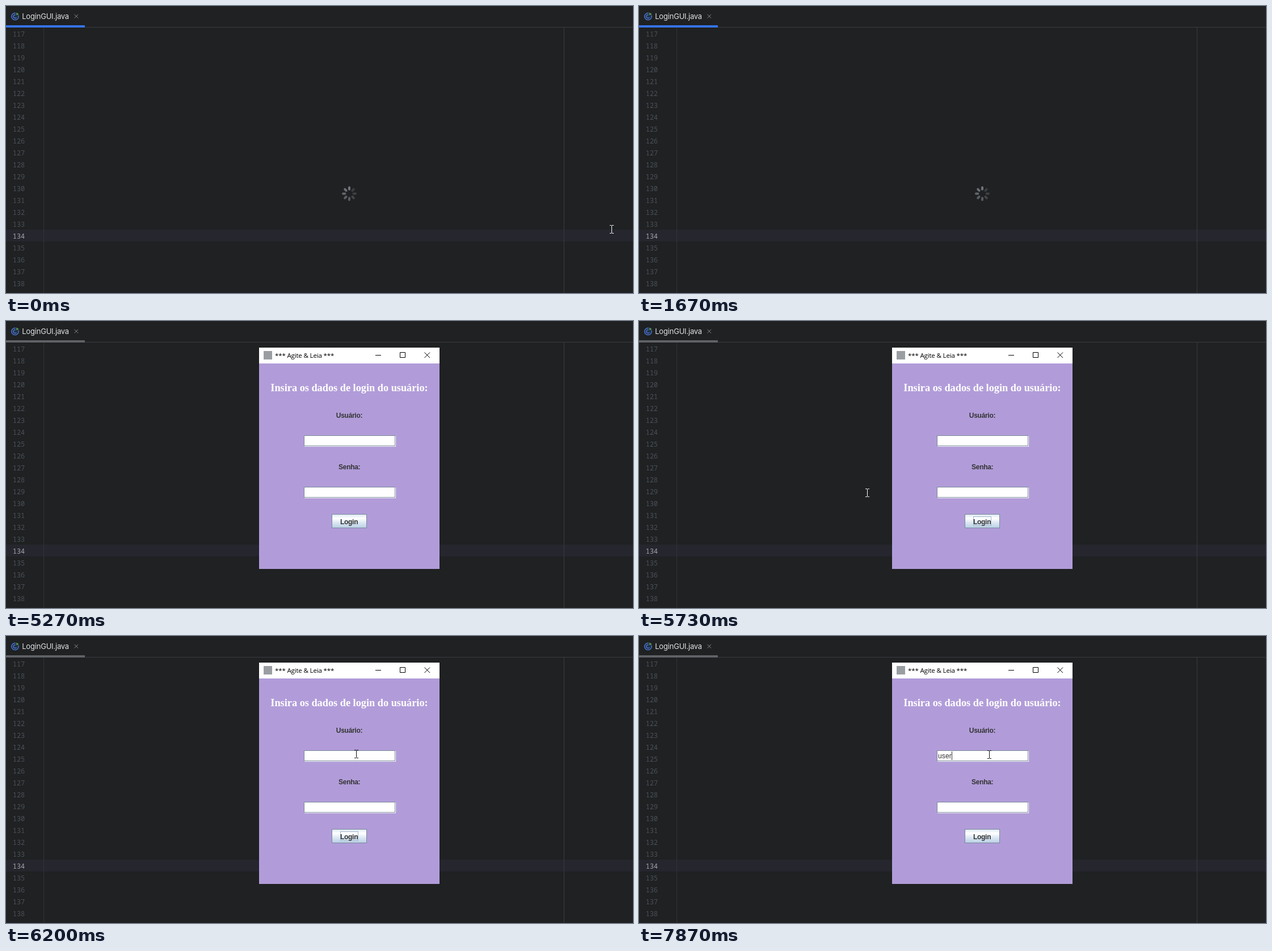
Animation, 1105 px wide and 507 px high, one loop 8000 ms. Source, as an HTML page:

```html
<!DOCTYPE html>
<html lang="pt">
<head>
<meta charset="utf-8">
<title>Login</title>
<style>
  html, body { margin: 0; width: 100%; height: 100%; overflow: hidden; background: #1f2122; }
  svg { display: block; width: 100vw; height: 100vh; }
  text { white-space: pre; }
  .num { font: 12px "Noto Sans Mono", monospace; letter-spacing: -.1px; fill: #4b5059; }
  .num.now { fill: #a1a3ab; }
  .tab { font: 13px Inter, sans-serif; letter-spacing: -.2px; fill: #dfe1e5; }
  .title { font: 11.5px "Open Sans", sans-serif; letter-spacing: -.15px; }
  .head { font: bold 18.3px "Liberation Serif", serif; fill: #fff; text-anchor: middle; }
  .label { font: bold 12px "Liberation Sans", sans-serif; letter-spacing: -.3px; fill: #333; text-anchor: middle; }
  .input { font: 12px "Liberation Sans", sans-serif; letter-spacing: .15px; fill: #333; }
  .crisp { shape-rendering: crispEdges; }
</style>
</head>
<body>
<svg viewBox="0 0 1105 507">
  <defs>
    <linearGradient id="metal" x2="0" y2="1">
      <stop offset="0" stop-color="#dde8f3"/>
      <stop offset=".3" stop-color="#fff"/>
      <stop offset=".6" stop-color="#dde8f3"/>
      <stop offset="1" stop-color="#b8cfe5"/>
    </linearGradient>
    <g id="field" class="crisp" fill="none">
      <rect x="1" y="1" width="161" height="19" fill="#fff"/>
      <path d="M.5 .5H160.5V18.5H.5Z" stroke="#7a8a99"/>
    </g>
  </defs>

  <rect width="1105" height="507" fill="#1f2122"/>
  <g class="crisp">
    <rect y="395" width="1105" height="21" fill="#26262e"/>
    <rect y="37" width="1105" height="1" fill="#393b40"/>
    <rect x="66" y="38" width="1" height="469" fill="#313438"/>
    <rect x="983" y="38" width="1" height="469" fill="#393b40"/>
  </g>
  <rect id="underline" y="34" width="139" height="4" rx="1"/>
  <g fill="none" stroke="#548af7" stroke-width="1.1">
    <circle cx="16" cy="18.5" r="6.3" fill="#25324d"/>
    <path d="M18.3 16.6A3 3 0 1 0 18.3 20.4"/>
    <path d="M17.6 10.6L24 14.2L17.6 17.8Z" fill="#57965c" stroke="#1f2122"/>
  </g>
  <text class="tab" x="28.2" y="23">LoginGUI.java</text>
  <path d="M120.5 14.8l6.6 6.6m0-6.6l-6.6 6.6" stroke="#868a91"/>
  <g id="lines"></g>
  <g id="spinner" stroke="#868a91" stroke-width="4" stroke-linecap="round"></g>
  <rect id="editCaret" class="crisp" x="69" y="396" width="2" height="18" fill="#ced0d6"/>

  <g id="dialog">
    <rect x="446" y="47" width="318" height="391" fill="#b19cd9"/>
    <rect x="446" y="47" width="318" height="28" fill="#fff"/>
    <rect x="454" y="53" width="15" height="15" fill="#9a9ea3"/>
    <text class="title" x="474" y="65">*** Agite &amp; Leia ***</text>
    <path d="M651 60.5h10M694.5 55.5h9v9h-9zM737.5 55.5l9.5 9.5m0-9.5l-9.5 9.5" fill="none" stroke="#000"/>
    <text class="head" x="605" y="124">Insira os dados de login do usuário:</text>
    <text class="label" x="605" y="171">Usuário:</text>
    <use href="#field" x="525" y="202"/>
    <text class="label" x="605.2" y="262">Senha:</text>
    <use href="#field" x="525" y="293"/>
    <rect x="574.5" y="341.5" width="61" height="24" fill="url(#metal)" stroke="#7a8a99"/>
    <rect id="focus" x="589.5" y="345.5" width="31" height="16" fill="none" stroke="#a3b8cc"/>
    <text class="label" x="604.6" y="358.5">Login</text>
    <text id="typed" class="input" x="527" y="216"></text>
    <rect id="fieldCaret" class="crisp" y="204" width="1" height="15" fill="#333"/>
  </g>

  <path id="beam" class="crisp" d="M-3 -6.5H0M1 -6.5H4M.5 -6V7M-3 7.5H0M1 7.5H4" fill="none"/>
  <path id="arrow" d="M.5 .5V16.5L4.3 12.9L6.8 18.6L9.2 17.5L6.8 12H11.8Z" fill="#fff" stroke="#000"/>
</svg>
<script>
const LOOP = 8000, TICK = 1000 / 15;
const el = id => document.getElementById(id);
const show = (id, on) => el(id).setAttribute('visibility', on ? 'visible' : 'hidden');
const within = (t, spans) => spans.some(([a, b]) => t >= a && t < b);

el('lines').innerHTML = Array.from({ length: 23 }, (_, i) =>
  `<text class="num${i === 17 ? ' now' : ''}" x="11.8" y="${53.5 + i * 21}">${117 + i}</text>`).join('');

el('spinner').innerHTML = [.8, .28, .3, .35, .55, .58, .66, .74].map((o, i) =>
  `<path d="M0 -7.7V-11" opacity="${o}" transform="translate(605 331.5) rotate(${i * 45})"/>`).join('');

// Pointer paths as [time, x, y]; each ends when the pointer hides or the loop restarts.
const exitPath = [[0, 1067, 394], [70, 1067, 394], [130, 1061, 388], [200, 1022, 396],
  [270, 962, 424], [330, 912, 451], [400, 895, 462], [540, 895, 462], [600, 894, 465], [670, 892, 466]];
const entryPath = [[5600, 164, 500], [5730, 402, 303], [5870, 548, 205], [6000, 612, 178],
  [6130, 616, 200], [6200, 617, 208], [6270, 617, 208], [6330, 617, 209]];

function along(path, t) {
  const i = path.findIndex(p => p[0] > t);
  if (i < 0) return path[path.length - 1].slice(1);
  const [t0, x0, y0] = path[Math.max(0, i - 1)], [t1, x1, y1] = path[i];
  const k = t1 > t0 ? (t - t0) / (t1 - t0) : 0;
  return [x0 + (x1 - x0) * k, y0 + (y1 - y0) * k].map(Math.round);
}

function pointer(t) {
  const entering = t >= 5600;
  const visible = entering || t < 730;
  const [x, y] = along(entering ? entryPath : exitPath, t);
  const overDialog = entering && x >= 446 && x < 764 && y >= 47 && y < 438;
  const overField = overDialog && x >= 525 && x < 687 && y >= 202 && y < 222;
  const arrow = overDialog && !overField;
  show('arrow', visible && arrow);
  show('beam', visible && !arrow);
  el('beam').setAttribute('stroke', overField ? '#111' : '#fff');
  for (const id of ['arrow', 'beam']) el(id).setAttribute('transform', `translate(${x} ${y})`);
}

const keyTimes = [7400, 7530, 7800, 7870], caretX = [527, 534, 540, 547, 551];

function draw(now) {
  // Hold each pose for one tick of the 15 Hz clock, rounded to 10 ms.
  const t = Math.round(Math.floor((now % LOOP + 5) / TICK) * TICK / 10) * 10;
  el('underline').setAttribute('fill', t < 2270 ? '#3574f0' : '#5f6266');
  show('editCaret', within(t, [[200, 670], [1200, 1670], [2200, 2270]]));
  el('dialog').setAttribute('display', t < 5270 ? 'none' : 'inline');
  show('focus', within(t, [[5470, 6470]]));
  const n = keyTimes.filter(k => t >= k).length;
  el('typed').textContent = 'user'.slice(0, n);
  el('fieldCaret').setAttribute('x', caretX[n]);
  show('fieldCaret', within(t, [[6470, 6930], [7400, LOOP]]));
  pointer(t);
}

const start = performance.now();
function tick() {
  draw(performance.now() - start);
  requestAnimationFrame(tick);
}
tick();
</script>
</body>
</html>
```
